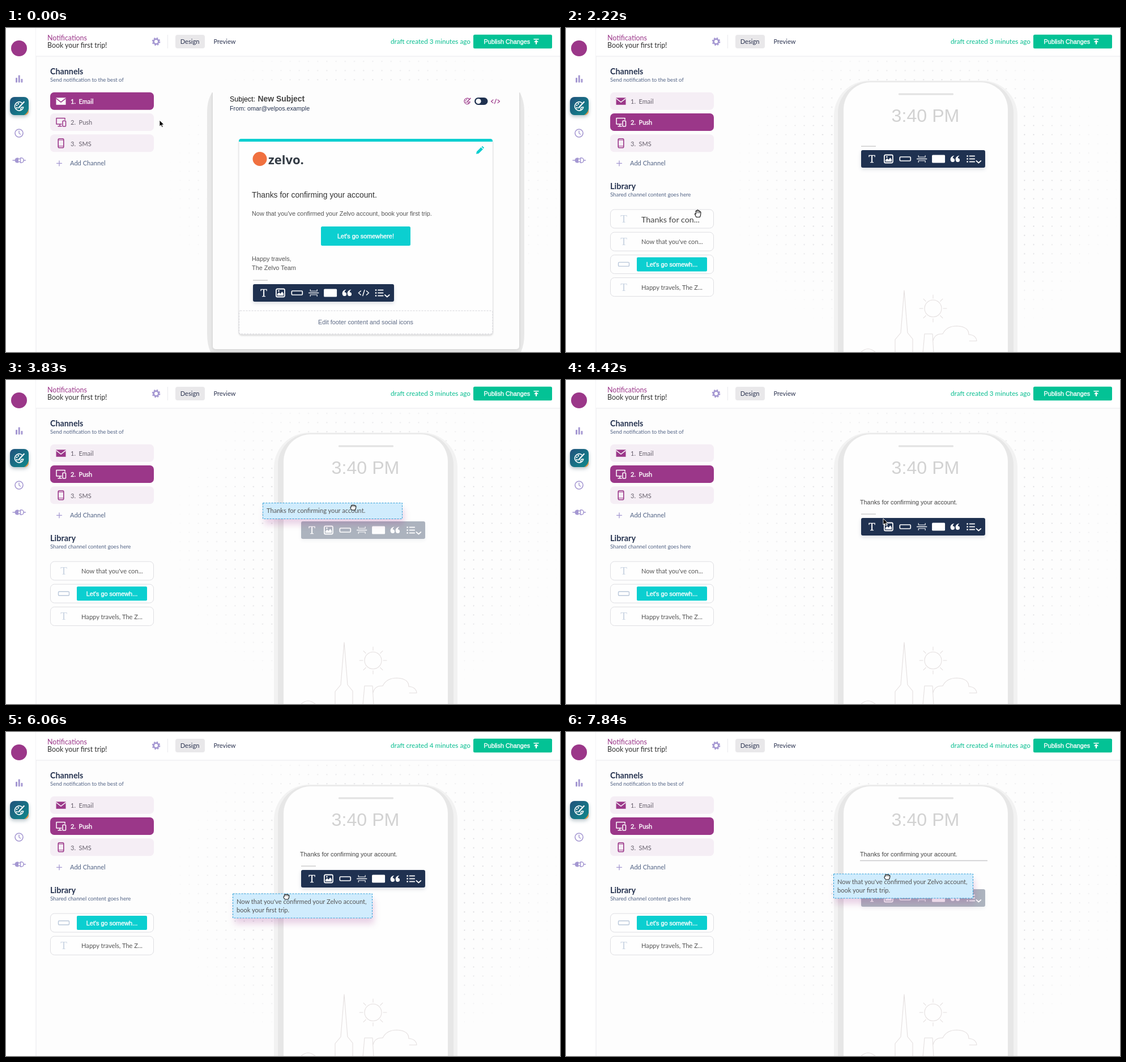
Write an HTML page that moves like this. It is 978 by 573 pixels and loops after 7990 ms.

```html
<!DOCTYPE html>
<html lang="en">
<head>
<meta charset="utf-8">
<title>Channel designer</title>
<style>
html, body { margin: 0; width: 100%; height: 100%; overflow: hidden; background: #fdfdfd; }
svg { display: block; }
text { font-family: Lato, "Open Sans", sans-serif; white-space: pre; }
.arial { font-family: "Liberation Sans", Arial, sans-serif; }
.serif { font-family: "Liberation Serif", Times, serif; }
.semi { stroke: currentColor; stroke-width: .35; }
.card { filter: drop-shadow(3px 10px 6px rgba(160, 50, 140, .22)); }
.bar { filter: drop-shadow(0 3px 3px rgba(31, 49, 80, .16)); }
.tile { filter: drop-shadow(0 3px 3px rgba(20, 60, 80, .3)); }
.line { fill: none; stroke: currentColor; stroke-linecap: round; stroke-linejoin: round; }
</style>
</head>
<body>
<svg id="stage" width="978" height="573" viewBox="0 0 978 573"></svg>
<script>
const PLUM = '#9b3789', NAVY = '#1f3150', TEAL = '#0bcfd0', LILAC = '#a598d2', INK = '#555';
const LOOP = 7990, STEP = 147.9, LAST = 53;

const text = (x, y, s, size, fill, more = '') =>
  `<text x="${x}" y="${y}" font-size="${size}" fill="${fill}" color="${fill}" ${more}>${s}</text>`;
const rect = (x, y, w, h, fill, r = 0, more = '') =>
  `<rect x="${x}" y="${y}" width="${w}" height="${h}" rx="${r}" fill="${fill}" ${more}/>`;
const line = (d, color, w = 1, more = '') =>
  `<path d="${d}" class="line" color="${color}" stroke-width="${w}" ${more}/>`;
const group = (x, y, body, scale = 1) =>
  `<g transform="translate(${x} ${y}) scale(${scale})">${body}</g>`;
const SANS = 'class="arial"', BOLD = 'font-weight="700"', MID = 'text-anchor="middle"';

// icons, each centred on its own origin
const gear = color => `<g fill="none" stroke="${color}"><circle r="4.4" stroke-width="2.8"/>
  <circle r="6.3" stroke-width="2" stroke-dasharray="2.6 2.348"/></g>`;
const palette = color => line('M4.5 -5.6A7 7 0 1 0 7 1.5C4 1 2.5 2 3 4.5Q3 6.5 1 7', color, 1.5) +
  line('M8 -7L1.5 0L-.5 2.5', color, 2) +
  [[-3.6, -1.6], [-1, -4], [-3.4, 2.4]].map(([x, y]) => `<circle cx="${x}" cy="${y}" r="1.2" fill="${color}"/>`).join('');
const mail = `<path d="M-8.5 -6H8.5V6.5H-8.5Z" fill="currentColor"/>` +
  line('M-8 -4.5L0 1.8L8 -4.5', 'var(--gap)', 1.5);
const devices = line('M7 -4.5V-7H-8V3.5H1M-5 7.2H1M-2 3.5V7', 'currentColor', 1.5) +
  `<rect x="3" y="-2.2" width="5.5" height="9.6" rx="1" class="line" stroke-width="1.5"/>`;
const mobile = `<rect x="-4.8" y="-8" width="9.6" height="16" rx="2" class="line" stroke-width="1.6"/>` +
  line('M-4 -5.6H4M-4 5.2H4', 'currentColor', 1);

const W = '#fff';
const tools = {
  T: text(0, 6.5, 'T', 19, W, `class="serif" ${MID} stroke="#fff" stroke-width=".4"`),
  image: `<rect x="-7.5" y="-7" width="15" height="14" rx="2" fill="none" stroke="#fff" stroke-width="1.8"/>
    <path d="M-5.5 4.8V2L-2.5 -1L0 1.5L3 -2.2L5.5 1V4.8Z" fill="#fff"/><circle cx="-3" cy="-3.4" r="1.4" fill="#fff"/>`,
  button: `<rect x="-9.5" y="-3.5" width="19" height="7" rx="1.5" fill="none" stroke="#fff" stroke-width="1.7"/>`,
  divider: line('M-8.5 0H8.5', W, 1.5) + line('M-6 -6V-3.2H6V-6M-6 6V3.2H6V6', W, 1.1),
  mark: rect(-11.5, -7, 23, 14, W, 1.5),
  quote: [-8, 1].map(x => `<path d="M${x + 6.5} -6C${x} -5 ${x - 1} 0 ${x} 3A3.6 3.4 0 1 0 ${x + 3.6} -1.2Q${x + 4} -4 ${x + 6.5} -6Z" fill="#fff"/>`).join(''),
  code: line('M-5 -3.5L-9 0L-5 3.5M5 -3.5L9 0L5 3.5M1.6 -5L-1.6 5', W, 1.5),
  list: [-5, 0, 5].map(y => rect(-7.5, y - 1.2, 2.4, 2.4, W) + rect(-3, y - .9, 10, 1.8, W)).join('') +
    line('M9.5 3.5L13.5 7L17.5 3.5', W, 1.7)
};
function toolbar(w, names) {
  return rect(0, 0, w, 31, NAVY, 3, 'class="bar"') +
    names.map((n, i) => group(19 + i * 29.4 - (n === 'list' ? 1.5 : 0), 15.5, tools[n])).join('');
}
const caret = rect(0, -7.5, 26, 1.3, '#c8c8c8', 0, 'class="caret"');
const basic = ['T', 'image', 'button', 'divider', 'mark', 'quote'];

function channel(id, y, n, name, icon) {
  return `<g id="${id}">${rect(78, y, 183, 31, 'var(--fill)', 7)}` +
    group(97, y + 15.5, icon) +
    `<text x="114" y="${y + 20.3}" font-size="11" fill="var(--ink)" color="var(--ink)">${n}.&#160; ${name}</text></g>`;
}

function shelf(id, kind, label, size = 11.15) {
  const box = rect(.5, .5, 182, 33, '#fefefe', 7, 'stroke="#dedee2"');
  const body = kind === 'T'
    ? text(24, 23.5, 'T', 19, '#c8d3e2', `class="serif" ${MID}`) + text(55, size > 12 ? 23 : 21.7, label, size, size > 12 ? '#444' : INK)
    : rect(14.5, 13.5, 19, 7, 'none', 1.5, 'stroke="#b9c7da" stroke-width="1.4"') + rect(47, 4.5, 124, 25, TEAL, 2) +
      text(109, 21, label, 10.9, W, `class="arial semi" ${MID}`);
  return `<g id="${id}">${box}${body}</g>`;
}

function dragged(id, h, lines) {
  return `<g id="${id}">${rect(.5, .5, 246, h, '#d0ecfd', 0, 'class="card"')}
    ${rect(.5, .5, 246, h, 'none', 0, 'stroke="#2f9fd6" stroke-dasharray="3 2"')}
    ${lines.map((s, i) => text(7, 18 + i * 15, s, 11.1, INK)).join('')}</g>`;
}

const sidebar = rect(0, 0, 53, 573, W) + rect(52.5, 0, 1, 573, '#e9e9ee') +
  `<circle cx="23" cy="36" r="14" fill="${PLUM}"/>` +
  rect(17, 88, 3, 8.5, LILAC, 1) + rect(21.7, 83.5, 3, 13, LILAC, 1) + rect(26.4, 90, 3, 6.5, LILAC, 1) +
  rect(7, 122, 33, 32, 'url(#tile)', 8, 'class="tile"') +
  '<path d="M40 143V146Q40 154 32 154Q38 151 40 143Z" fill="#e99a4c"/>' +
  group(23, 138.5, palette(W), 1.1) +
  `<circle cx="23" cy="186" r="7" fill="none" stroke="${LILAC}" stroke-width="1.6"/>` +
  line('M23 182V186L25.5 188', LILAC, 1.4) +
  line('M12 234H16M22 231.5H25M22 236.5H25M31 234H34.5', LILAC, 1.5) +
  `<path d="M22 229.5V238.5H20A4.5 4.5 0 0 1 20 229.5Z" fill="${LILAC}"/>` +
  line('M25.5 229.8V238.2H27A4.2 4.2 0 0 0 27 229.8Z', LILAC, 1.5);

const header = rect(53, 0, 925, 50, W) + rect(53, 49.5, 925, 1, '#e9e9ee') +
  text(73, 21.8, 'Notifications', 12.4, PLUM) + text(73, 35, 'Book your first trip!', 12.4, '#333') +
  group(265, 24, gear(LILAC)) + rect(285, 12, 1, 24, '#e9e9ee') +
  rect(299, 12, 52, 24, '#e9e8ea', 4) + text(307.7, 28, 'Design', 11.2, '#2b3350') +
  text(366.5, 28, 'Preview', 11.1, '#2b3350') +
  `<text x="679" y="28" font-size="11.7" fill="#06bd8f">draft created <tspan id="mins">3</tspan> minutes ago</text>` +
  rect(825, 11.7, 139, 24.6, '#03c295', 2.5) + text(843.5, 28, 'Publish Changes', 10.8, W, 'class="arial semi"') +
  line('M932 19.8H940', W, 1.6) + line('M936 28V23', W, 2.2) + '<path d="M932 25L936 21L940 25Z" fill="#fff"/>';

const panel = text(78, 82, 'Channels', 14.3, '#263350', BOLD) +
  text(78, 95, 'Send notification to the best of', 9.53, '#536486') +
  `<g id="tab">${rect(250, 151, 34, 31, '#ebe3f0', 6)}${group(268.5, 167.5, gear(LILAC))}</g>` +
  channel('email', 113.8, 1, 'Email', mail) + channel('push', 151, 2, 'Push', devices) +
  channel('sms', 188.2, 3, 'SMS', mobile) +
  line('M89.5 239.3H98.5M94 234.8V243.8', LILAC, 1.3) + text(113, 243.2, 'Add Channel', 11.1, '#536486') +
  `<g id="library">${text(78, 285, 'Library', 14.5, '#263350', BOLD)}
    ${text(78, 298, 'Shared channel content goes here', 9.6, '#536486')}
    ${shelf('s0', 'T', 'Thanks for con...', 14.3)}${shelf('s1', 'T', 'Now that you\'ve con...')}
    ${shelf('s2', 'B', 'Let\'s go somewh...')}${shelf('s3', 'T', 'Happy travels, The Z...')}</g>`;

const dots = rect(290, 51, 690, 510, 'url(#dots)', 0, 'mask="url(#fade)"');

const mailPane = `<g id="mailPane">${rect(355, 100, 560, 473, '#fdfdfd')}
  <path d="M365 113C358 122 355 134 355 150V540Q355 560 361 573H909Q915 560 915 540V150C915 134 912 122 906 113Z" fill="#e8e8e8"/>
  ${rect(365, 104, 541, 464, '#fdfdfd', 5, 'style="filter:drop-shadow(0 1px 2px rgba(0,0,0,.12))"')}
  ${rect(362, 100, 547, 14, '#fdfdfd')}
  ${text(395, 129.5, 'Subject:', 12.45, '#111', SANS)}
  ${text(444.5, 129.5, 'New Subject', 13.9, '#444', SANS + BOLD)}
  ${text(395, 146, 'From: omar@velpos.example', 10.75, '#263350', SANS)}
  ${group(814, 129.5, palette(PLUM), .75)}
  ${rect(827, 123, 23.5, 13, NAVY, 6.5)}<circle cx="834" cy="129.5" r="4.6" fill="#fff"/>
  ${line('M860 127L856.5 129.8L860 132.6M868 127L871.5 129.8L868 132.6M865.5 125.8L862.5 133.8', PLUM, 1.2)}
  ${rect(411, 197, 448.5, 345, '#fefefe', 5, 'stroke="#e2e2e4" style="filter:drop-shadow(0 2px 1px rgba(0,0,0,.12))"')}
  <path d="M411 201V200Q411 196 415 196H855Q859 196 859 200V201Z" fill="${TEAL}"/>
  <path d="M830 222.5L831 218.5L838.5 211L842 214.5L834.3 222L830 222.8ZM839.5 210L841 208.8L844 211.8L842.8 213.4Z" fill="${TEAL}"/>
  <circle cx="448" cy="231.5" r="12.5" fill="#f0703f"/>
  ${text(463, 240.5, 'zelvo.', 22, '#333b44', BOLD + ' style="font-family:\'Open Sans\',sans-serif"')}
  ${text(434, 300, 'Thanks for confirming your account.', 13.9, '#333', SANS)}
  ${text(434, 331.5, 'Now that you\'ve confirmed your Zelvo account, book your first trip.', 10.87, INK, SANS)}
  ${rect(556, 351, 158, 34, TEAL, 2.5)}
  ${text(635, 372, 'Let\'s go somewhere!', 10.87, W, `class="arial semi" ${MID}`)}
  ${text(434, 412, 'Happy travels,', 10.9, INK, SANS)}${text(434, 427.5, 'The Zelvo Team', 10.9, INK, SANS)}
  ${group(436, 453, caret + toolbar(249, [...basic, 'code', 'list']))}
  ${rect(411.5, 500, 447.5, 41, 'none', 2, 'stroke="#d3d3d8" stroke-dasharray="3 2"')}
  ${text(635, 524, 'Edit footer content and social icons', 10.83, '#5d6a85', `${SANS} ${MID}`)}</g>`;

const rays = Array.from({ length: 8 }, (_, i) => {
  const c = Math.cos(i * Math.PI / 4), s = Math.sin(i * Math.PI / 4);
  return `M${648 + 18 * c} ${496 + 18 * s}L${648 + 24 * c} ${496 + 24 * s}`;
}).join('');

const phone = `<g id="phone"><g id="bezel">${rect(473, 93, 324, 600, '#f2f2f2', 62)}
  ${rect(480, 94.5, 310, 600, '#e7e7e7', 56)}</g>
  ${rect(490, 96, 290, 600, '#fefefe', 48)}
  ${rect(587, 115.5, 97, 3, '#e2e2e2', 1)}
  ${text(634.5, 166.3, '3:40 PM', 32.2, '#d2d2d2', `${SANS} ${MID}`)}
  ${line('M581 575V551L591 539L597 464L603 539L612 550V575M630 575L633 541H647L649 575' +
    'M519 575Q533 560 548 575M648 553Q651 540 665 541Q672 527 690 527Q711 528 711 542Q724 543 725 553.5H712' +
    'M633 496a15 15 0 1 0 30 0a15 15 0 1 0 -30 0' + rays, '#e4dfdf', 1.1)}</g>`;

const pointer = `<path id="arrow" d="M0 0V11L2.6 8.7L4.4 12.6L6.2 11.8L4.5 8H8Z" fill="#000" stroke="#fff" stroke-width=".9"/>
  <g id="hand" fill="#fff" stroke="#111" stroke-width="1.1" stroke-linejoin="round">
    <path d="M-3 6.5L-5.5 1.5Q-6 -.5 -3.6 1L-4 -4Q-3 -6 -2 -4L-1.8 -5.4Q-.5 -7 .4 -5.2L.7 -4.8Q2 -6 2.7 -4L3 -2.6Q4.8 -4 5 -1.6L4.6 3L3.2 6.5Z"/>
    <path d="M-1.8 -4V-.5M.5 -4.8V-.5M2.8 -3.2V-.2" fill="none" stroke-width=".8"/></g>
  <g id="fist" fill="#fff" stroke="#111" stroke-width="1.1" stroke-linejoin="round">
    <path d="M-2.6 5L-4.8 2Q-5.4 -.5 -3.6 -.4V-2.6Q-2.8 -4.4 -1.6 -3Q-.4 -4.8 .8 -3.2Q2.2 -4.4 3 -2.6Q4.8 -3.2 5 -1L4.4 2.5L3 5Z"/>
    <path d="M-1.5 -2.4V-.6M.8 -2.6V-.6M3 -2V-.4" fill="none" stroke-width=".8"/></g>`;

document.getElementById('stage').innerHTML = `<defs>
  <linearGradient id="tile" x1="0" y1="0" x2="1" y2="1"><stop stop-color="#22527c"/><stop offset="1" stop-color="#0f8a8c"/></linearGradient>
  <pattern id="dots" x="444.9" y="50.9" width="16.2" height="16.2" patternUnits="userSpaceOnUse"><circle cx="8.1" cy="8.1" r="1" fill="#cfcfd4"/></pattern>
  <radialGradient id="glow"><stop offset=".6" stop-color="#fff"/><stop offset="1" stop-color="#000"/></radialGradient>
  <mask id="fade" maskUnits="userSpaceOnUse" x="290" y="0" width="690" height="573"><ellipse cx="635" cy="285" rx="350" ry="285" fill="url(#glow)"/></mask>
  <clipPath id="cut"><rect x="460" y="120" width="350" height="480"/></clipPath></defs>
  ${dots}${mailPane}${phone}
  <g id="bar">${caret + toolbar(219, [...basic, 'list'])}</g>
  <g id="placed">${text(519, 220, 'Thanks for confirming your account.', 10.82, '#444', SANS)}</g>
  <g id="slot">${rect(519, 226.7, 225, 1.6, '#cbcbcd')}</g>
  ${sidebar}${header}${panel}
  ${dragged('cardA', 28, ['Thanks for confirming your account.'])}
  ${dragged('cardB', 43, ['Now that you\'ve confirmed your Zelvo account,', 'book your first trip.'])}
  <g id="pointer">${pointer}</g>`;

// step, x, y
const path = [
  [0, 271, 163], [1, 260, 166], [2, 212, 164], [3, 191, 162], [9, 191, 162], [10, 192, 168], [12, 214, 240],
  [14, 232, 318], [15, 233, 328], [16, 236, 331], [17, 238, 333], [18, 246, 331], [19, 290, 315], [21, 460, 268],
  [23, 596, 236], [24, 611, 230], [25, 612, 227], [26, 613, 225], [28, 613, 225], [29, 608, 229], [30, 560, 245],
  [31, 440, 275], [32, 300, 305], [33, 215, 317], [34, 180, 320], [35, 172, 315], [36, 173, 328], [37, 182, 326],
  [39, 330, 305], [41, 495, 291], [42, 516, 287], [43, 516, 287], [44, 535, 280], [45, 551, 272], [46, 559, 265],
  [47, 564, 260], [48, 565.5, 257], [52, 565.5, 257], [53, 567, 256]
];
// step, top, opacity
const barPath = [
  [9, 222, .53], [10, 216, 1], [21, 216, 1], [22, 228, .75], [24, 250, .45], [26, 250, .36], [28, 250, .36],
  [29, 244, .7], [30, 244, 1], [43, 244, 1], [44, 262, .82], [45, 276, .64], [46, 278, .48], [48, 278, .36], [53, 278, .36]
];

function at(rows, k) {
  const i = rows.findIndex(r => r[0] >= k);
  if (i <= 0) return rows[i < 0 ? rows.length - 1 : 0].slice(1);
  const a = rows[i - 1], b = rows[i], p = (k - a[0]) / (b[0] - a[0]);
  return [1, 2].map(j => a[j] + (b[j] - a[j]) * p);
}

const el = id => document.getElementById(id);
const show = (id, on) => { el(id).style.display = on ? '' : 'none'; };
const move = (id, x, y) => el(id).setAttribute('transform', `translate(${x} ${y})`);

function paint(id, fill, on) {
  const s = el(id).style;
  s.setProperty('--fill', fill);
  s.setProperty('--gap', fill);
  s.setProperty('--ink', on ? W : '#66606c');
  s.color = on ? W : PLUM;
  el(id).querySelector('text').setAttribute('class', on ? 'semi' : '');
}

function draw(k) {
  const onPush = k >= 9, pale = '#f5eef5';
  paint('email', onPush ? pale : PLUM, !onPush);
  paint('push', k === 9 ? '#562a54' : onPush ? PLUM : pale, onPush);
  paint('sms', pale, false);
  show('tab', k >= 2 && k <= 10);
  show('mailPane', !onPush);
  ['phone', 'bar', 'library'].forEach(id => show(id, onPush));

  const rising = k === 9;
  move('phone', 0, rising ? 6 : 0);
  el('phone').style.opacity = rising ? .55 : 1;
  el('bezel').setAttribute('transform', rising ? 'translate(15.875 0) scale(.975 1)' : '');
  el('bezel').setAttribute('clip-path', rising ? 'url(#cut)' : 'none');

  const [top, alpha] = at(barPath, k);
  move('bar', 521, top);
  el('bar').style.opacity = alpha;
  el('bar').querySelector('.caret').style.display = alpha === 1 || rising ? '' : 'none';

  const gone = k >= 37 ? 2 : k >= 18 ? 1 : 0;
  for (let i = 0; i < 4; i++) {
    show('s' + i, i >= gone);
    move('s' + i, 78, 320.5 + (i - gone) * 40.2);
  }
  el('mins').textContent = k >= 40 ? 4 : 3;
  show('placed', k >= 29);
  show('slot', k >= 44);

  const [x, y] = at(path, k);
  const dragA = k >= 17 && k <= 28, dragB = k >= 36;
  show('cardA', dragA);
  show('cardB', dragB);
  if (k === 28) move('cardA', 512, 203);
  else move('cardA', x - 160, y - 8);
  move('cardB', x - 95, y - 5.5);

  const arrow = k < 2 || (k >= 29 && k <= 35);
  move('pointer', x, y);
  show('arrow', arrow);
  show('fist', dragA || dragB);
  show('hand', !arrow && !dragA && !dragB);
}

const start = performance.now();
let shown = -1;
function tick() {
  const t = (performance.now() - start) % LOOP;
  const k = Math.min(LAST, Math.floor((t + 20) / STEP));
  if (k !== shown) draw(shown = k);
  requestAnimationFrame(tick);
}
tick();
</script>
</body>
</html>
```
